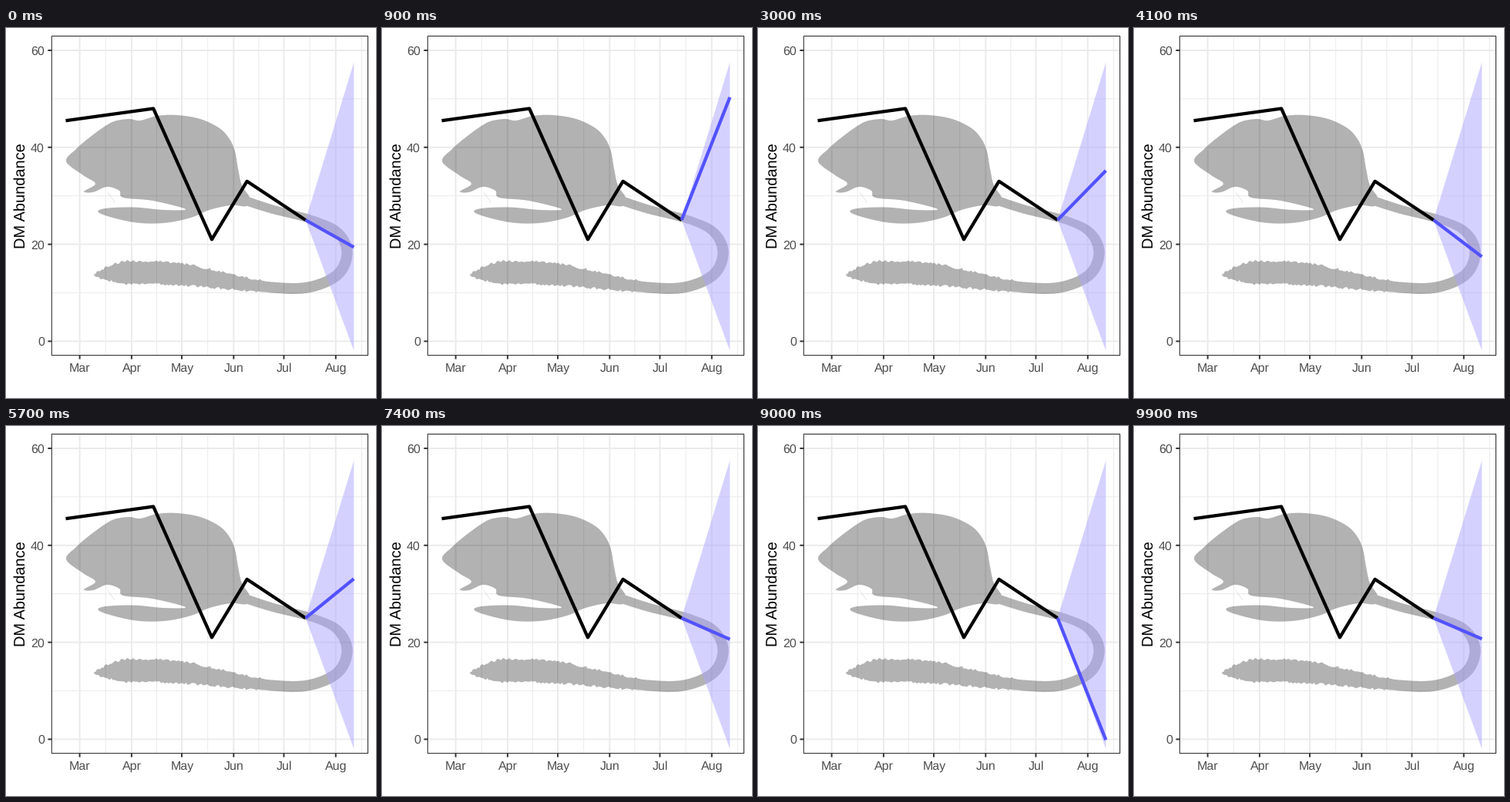
A matplotlib script that plays this animation: 480x480 px, repeating every 10000 ms.

```python
import numpy as np
import matplotlib.pyplot as plt
from matplotlib.animation import FuncAnimation
from matplotlib.patches import PathPatch, Polygon, Rectangle
from matplotlib.path import Path

SIZE, DPI, FRAMES, INTERVAL = 480, 80, 100, 100
PT = 72 / DPI
LEFT, RIGHT, TOP, BOTTOM = 59.3, 469.5, 10.5, 424.6
GRID, DARK, LABEL = "#ebebeb", "#333333", "#4d4d4d"

plt.rcParams["font.family"] = "Liberation Sans"
plt.rcParams["text.hinting"] = "none"

fig = plt.figure(figsize=(SIZE / DPI, SIZE / DPI), dpi=DPI, facecolor="white")
ax = fig.add_axes([0, 0, 1, 1])
ax.set(xlim=(0, SIZE), ylim=(SIZE, 0))
ax.axis("off")


def x_of(day):
    """Pixel of a day counted from 1 March."""
    return 95.6 + 2.171 * day


def y_of(value):
    return 406.4 - 6.29 * value


def line(xs, ys, color, width, z, **kw):
    return ax.plot(xs, ys, color=color, lw=width * PT, zorder=z, snap=False,
                   solid_capstyle="butt", solid_joinstyle="round", **kw)[0]


def label(x, y, text, size, color, **kw):
    ax.text(x, y, text, fontsize=size * PT, color=color, va="baseline",
            rotation_mode="anchor", **kw)


def draw_axes():
    starts = np.cumsum([0, 31, 30, 31, 30, 31, 31])
    for day in (starts[:-1] + starts[1:]) / 2:
        line([x_of(day)] * 2, [TOP, BOTTOM], GRID, 1, 1)
    for v in range(0, 61, 10):
        major = v % 20 == 0
        line([LEFT, RIGHT], [y_of(v)] * 2, GRID, 1.94 if major else 1, 1)
        if major:
            line([LEFT - 5, LEFT], [y_of(v)] * 2, DARK, 1.94, 8)
            label(49.9, y_of(v) + 5.8, str(v), 16, LABEL, ha="right")
    for day, name in zip(starts, "Mar Apr May Jun Jul Aug".split()):
        x = x_of(day)
        line([x] * 2, [TOP, BOTTOM], GRID, 1.94, 1)
        line([x] * 2, [BOTTOM, BOTTOM + 5], DARK, 1.94, 8)
        label(x + 0.3, 446, name, 16, LABEL, ha="center")
    label(24.5, 217.7, "DM Abundance", 20, "black", ha="center", rotation=90)
    ax.add_patch(Rectangle((LEFT, TOP), RIGHT - LEFT, BOTTOM - TOP, fill=False,
                           ec=DARK, lw=1.1 * PT, zorder=9, snap=False))


def spline(points, steps, closed=False):
    """Catmull-Rom curve through the points."""
    p = np.asarray(points, float)
    p = np.vstack([p[-1], p, p[:2]]) if closed else np.vstack([p[0], p, p[-1]])
    t = np.linspace(0, 1, steps, endpoint=False)[:, None]
    parts = [b + t * (c - a) / 2 + t**2 * (a - 2.5 * b + 2 * c - d / 2)
             + t**3 * (1.5 * (b - c) + (d - a) / 2)
             for a, b, c, d in zip(p, p[1:], p[2:], p[3:])]
    return np.vstack(parts + [p[-2:-1]])


BACK = [(78, 173), (91, 157), (107, 143), (129, 127), (142, 120.5),
        (160, 118), (174, 120), (196, 114), (222, 113), (252, 118),
        (277, 130), (290, 144), (297, 160), (301, 182), (306, 204), (316, 220)]
FOOT = [(312, 231), (292, 230), (264, 236), (240, 246), (205, 253),
        (165, 252), (123, 241), (126, 234.5), (165, 232.5), (205, 236),
        (233, 235)]
HEAD = [(190, 224), (152, 220), (147, 211), (131, 206), (113, 213),
        (101, 212), (116, 202), (100, 191)]
TAIL = [(305, 222), (345, 235), (400, 249.5), (431, 265.5), (442.5, 292),
        (430, 320), (393, 336.3), (345, 336.5), (285, 328), (225, 319.5),
        (165, 317), (114, 320.5)]


def tail_outline():
    """Smooth tail that widens into a furry brush."""
    rng = np.random.default_rng(5)
    x, y = spline(TAIL, 24).T
    s = np.linspace(0, 1, len(x))
    half = np.interp(s, [0, 0.2, 0.35, 0.65, 0.82, 0.93, 1],
                     [6, 5.2, 7.2, 7, 14.5, 15, 1])
    fur = np.where(s > 0.66, 1.6, 0.1)
    dx, dy = np.gradient(x), np.gradient(y)
    normal = np.column_stack([-dy, dx]) / np.hypot(dx, dy)[:, None]
    sides = [np.column_stack([x, y]) + sign * normal
             * (half + fur * rng.uniform(-1, 1, len(x)))[:, None]
             for sign in (1, -1)]
    return np.vstack([sides[0], sides[1][::-1]])


def clockwise(p):
    x, y = p.T
    return p if np.sum(x * np.roll(y, -1) - y * np.roll(x, -1)) > 0 else p[::-1]


def draw_rodent():
    loops = [clockwise(p) for p in
             (spline(BACK + FOOT + HEAD, 8, True), tail_outline())]
    shape = Path.make_compound_path(
        *[Path(np.vstack([p, p[:1]]), closed=True) for p in loops])
    ax.add_patch(PathPatch(shape, fc="black", ec="none", alpha=0.3, zorder=2))
    line([132, 141], [213, 226], "black", 0.6, 2, alpha=0.15)


# Forecast abundance in each random draw
DRAWS = [19.4, 32.8, 50.9, 27.7, 30, 53.3, 34.6, 9, 17.6, 21,
         46, 33.1, 28.8, 28.4, 19.5, 54.3, 35.1, -1.4, 38.1, 20.7]
KEYS = np.round(np.linspace(0, FRAMES - 1, len(DRAWS)))
NOW, END = (388.6, y_of(25)), 451.3

draw_axes()
draw_rodent()
ax.add_patch(Polygon([NOW, (END, y_of(57.5)), (END, y_of(-1.95))],
                     fc="#ada5ff", ec="none", alpha=0.5, zorder=4))
line([77.5, 191.2, 267, 312.6, NOW[0]],
     [y_of(v) for v in (45.5, 48, 21, 33, 25)], "black", 4.27, 5)
forecast = line([], [], "#5252ff", 4.27, 6)


def cubic_in_out(t):
    return 4 * t**3 if t < 0.5 else 1 - 4 * (1 - t)**3


def update(frame):
    i = min(np.searchsorted(KEYS, frame, "right") - 1, len(DRAWS) - 2)
    t = cubic_in_out((frame - KEYS[i]) / (KEYS[i + 1] - KEYS[i]))
    value = DRAWS[i] + t * (DRAWS[i + 1] - DRAWS[i])
    forecast.set_data([NOW[0], END], [NOW[1], y_of(value)])
    return [forecast]


anim = FuncAnimation(fig, update, frames=FRAMES, interval=INTERVAL,
                     repeat=True, repeat_delay=0)
plt.show()
```
